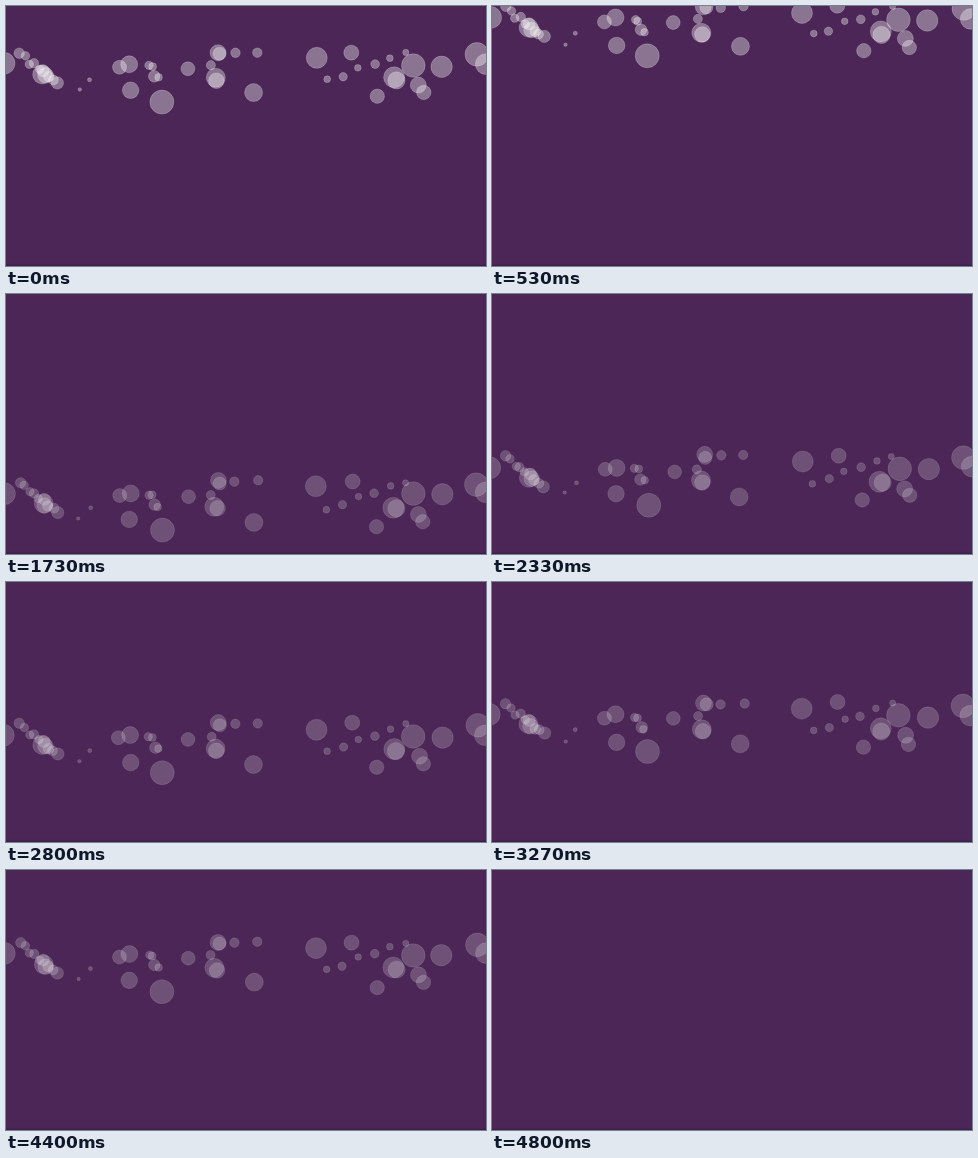
Write an HTML page with a canvas that moves like this. It is 480 by 260 pixels and loops after 4.99 s.

```html
<!DOCTYPE html>
<html lang="en">
<head>
<meta charset="utf-8">
<title>Rising bubbles</title>
<style>
  html, body { margin: 0; width: 100%; height: 100%; overflow: hidden; background: #4b2656; }
  canvas { display: block; }
</style>
</head>
<body>
<canvas id="stage" width="480" height="260"></canvas>
<script>
const W = 480, H = 260;
const LOOP = 4990, FPS = 15;
const BLANK_AT = 4.8;                 // seconds; empty until the loop restarts
const SLOW_AT = 1.03;                 // seconds; speed and opacity drop here
const FAST = 86, SLOW = 43.2;         // px per second
const TOP = 46;                       // highest starting position

const random = seed => {
  const v = Math.sin(seed * 12.9898) * 43758.5453;
  return v - Math.floor(v);
};
const mix = (a, b, k) => a + (b - a) * k;

// Large bubbles: x, y, radius
const singles = [
  [-2, 58, 11], [113, 61, 7], [124, 58, 8.5], [124, 85, 8.3], [156, 95.3, 12],
  [248, 87, 9], [310, 52, 10.5], [346, 46, 7.5], [371, 91, 7.2], [407, 59, 11.8],
  [413, 79, 8], [417, 87, 7.2], [436, 60, 10.7], [471, 49, 11.8], [479, 58, 10.3]
];

// Large bubbles that carry a smaller one almost on top
const pairs = [[37, 68, 9.5], [212, 46, 8], [209, 72, 9.5], [388, 72, 10.5]];

// Trails of small bubbles: start x, y, end x, y, mean radius, count
const trails = [
  [14, 47, 52, 77, 5.2, 9], [73, 84, 84, 73, 2.2, 2], [143, 60, 152, 72, 5, 4],
  [182, 62, 252, 46, 6, 4], [321, 74, 400, 47, 4, 6]
];

function makeTrail([x0, y0, x1, y1, r, n]) {
  return Array.from({ length: n }, (_, i) => {
    const k = i / (n - 1), bend = Math.sin(Math.PI * k);
    const spread = 10 * (random(x0 + i) - 0.5) * bend;
    return [mix(x0, x1, k), Math.max(TOP, mix(y0, y1, k) + spread),
            r * mix(0.75, 1.25, random(y0 + i))];
  });
}

const bubbles = [
  ...singles,
  ...pairs.flatMap(([x, y, r]) => [[x, y, r], [x + 2, y + 2, r * 0.82]]),
  ...trails.flatMap(makeTrail)
];

const ctx = document.getElementById('stage').getContext('2d');
const shade = ctx.createLinearGradient(0, H - 3, 0, H);
shade.addColorStop(0, 'rgba(0,0,0,0)');
shade.addColorStop(1, 'rgba(0,0,0,.18)');

const rise = t => FAST * Math.min(t, SLOW_AT) + SLOW * Math.max(0, t - SLOW_AT);
const sway = (t, seed) => 0.8 * Math.sin(t * mix(1.5, 3, random(seed)) + seed * 2.4);

function drawBubble([x, y, r], i, t) {
  let top = y - rise(t);
  if (top < 0) top += H;
  ctx.beginPath();
  ctx.arc(x + sway(t, i), top + sway(t, i + 7), r, 0, 2 * Math.PI);
  ctx.fill();
  ctx.stroke();
}

function draw(t) {
  ctx.fillStyle = '#4b2656';
  ctx.fillRect(0, 0, W, H);
  if (t < BLANK_AT) {
    ctx.fillStyle = 'rgba(255,255,255,.2)';
    ctx.strokeStyle = 'rgba(255,255,255,.11)';
    const passes = t < SLOW_AT ? 2 : 1;
    for (let p = 0; p < passes; p++) bubbles.forEach((b, i) => drawBubble(b, i, t));
  }
  ctx.fillStyle = shade;
  ctx.fillRect(0, H - 3, W, 3);
}

const start = performance.now();
function tick() {
  const ms = (performance.now() - start) % LOOP;
  draw(Math.floor((ms + 4) * FPS / 1000) / FPS);
  requestAnimationFrame(tick);
}
tick();
</script>
</body>
</html>
```
